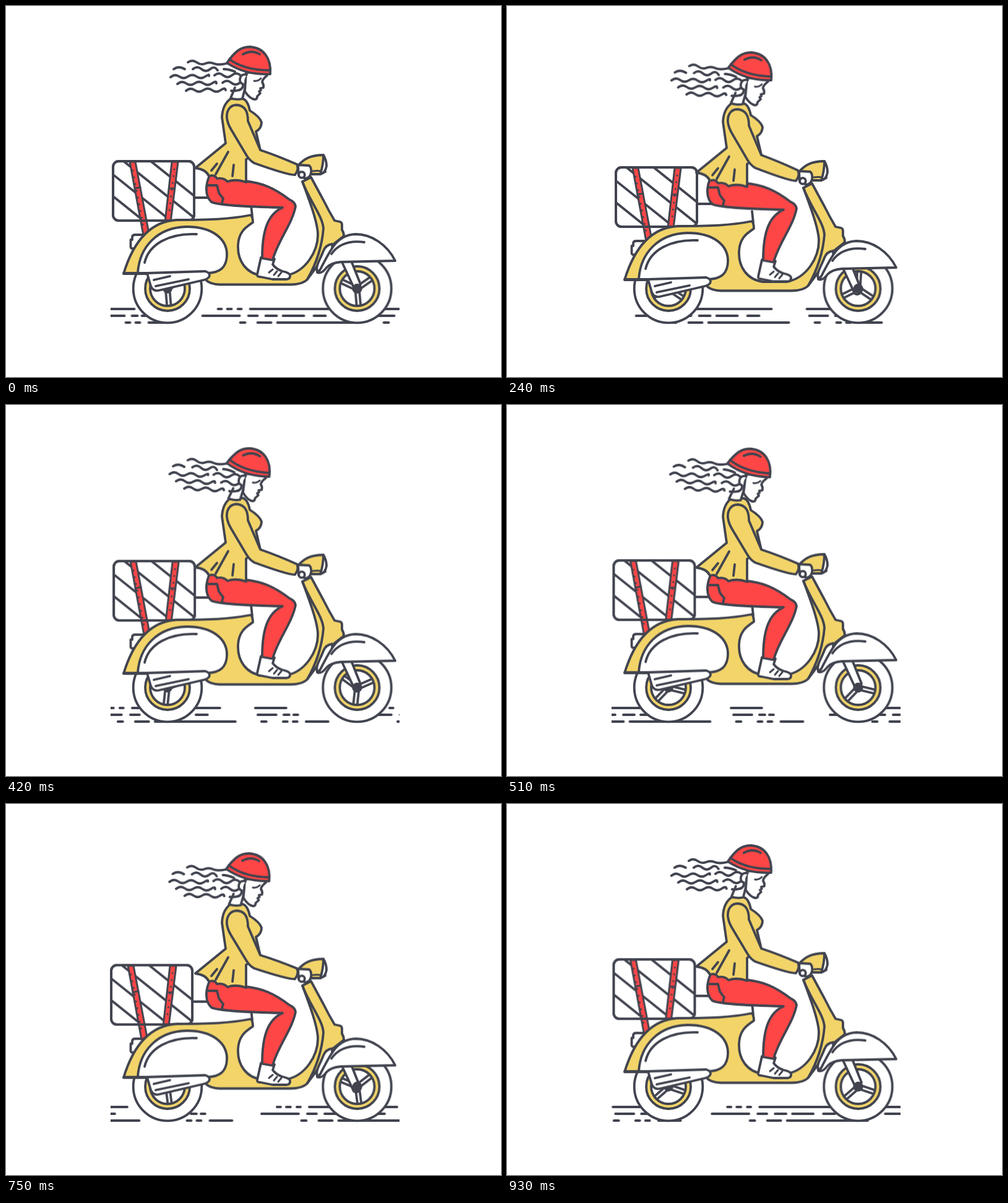
An HTML page for the animation above (0.96 s loop, 800x600 px).

```html
<!DOCTYPE html>
<html lang="en">
<head>
<meta charset="utf-8">
<title>Scooter ride</title>
<style>
html,body{margin:0;width:100%;height:100%;overflow:hidden;background:#fff}
svg{display:block;width:800px;height:600px;fill:none;stroke:#41444f;stroke-width:3.8;stroke-linecap:round;stroke-linejoin:round}
.w{fill:#fff}.y{fill:#f2d469}.r{fill:#ff4646}.k{fill:#41444f}
.thin{stroke-width:3}
.bob{animation:bob .24s cubic-bezier(.364,0,.636,1) infinite alternate}
.sway{animation:sway .48s cubic-bezier(.364,0,.636,1) -.24s infinite alternate}
.nod{animation:nod .48s cubic-bezier(.364,0,.636,1) -.81s infinite alternate}
.tilt{transform-origin:395px 100px;animation:tilt .48s cubic-bezier(.364,0,.636,1) infinite alternate}
.arm{transform-origin:480px 266px;animation:arm .48s cubic-bezier(.364,0,.636,1) -.24s infinite alternate}
.spin{animation:spin .96s linear infinite}
.road{animation:road .96s linear infinite}
@keyframes bob{to{transform:translateY(var(--d,10px))}}
@keyframes sway{
  from{transform:translate(calc(-1*var(--x,0px)),calc(-1*var(--y,0px)))}
  to{transform:translate(var(--x,0px),var(--y,0px))}
}
@keyframes nod{from{transform:translate(.5px,-1.4px)}to{transform:translate(-1.8px,5.4px)}}
@keyframes tilt{to{transform:rotate(3.4deg)}}
@keyframes arm{from{transform:skewY(-1.6deg)}to{transform:skewY(1.6deg)}}
@keyframes spin{to{transform:rotate(360deg)}}
@keyframes road{to{transform:translateX(var(--p))}}
</style>
</head>
<body>
<svg viewBox="0 0 800 600">
<defs>
  <clipPath id="strip"><path d="M169.5 480H635.5V525H169.5Z"/></clipPath>
  <clipPath id="crate"><rect x="173" y="251" width="131" height="96" rx="9"/></clipPath>
  <g id="far">
    <path d="M343 490h6m9 0h7m10 0h6m14 0h142m57 0h50"/>
    <path d="M318 501h60m14 0h15m13 0h18m10 0h34m16 0h19m81 0h30m12 0h9m7 0h7"/>
  </g>
  <path id="near" d="M159 512h8m27 0h7m9 0h7m14 0h36m112 0h8m20 0h22m10 0h130"/>
  <path id="spoke" d="M0-3.2H27M0 3.2H27"/>
  <g id="wheel">
    <circle class="w" r="55.3"/>
    <circle class="y" r="36"/>
    <circle class="w" r="28"/>
    <g class="spin">
      <use href="#spoke" transform="rotate(60)"/>
      <use href="#spoke" transform="rotate(180)"/>
      <use href="#spoke" transform="rotate(300)"/>
    </g>
    <circle class="k" r="6"/>
  </g>
</defs>

<g clip-path="url(#strip)">
  <g class="road" style="--p:-436px">
    <use href="#far" x="-436"/><use href="#far"/><use href="#far" x="436"/>
  </g>
  <g class="road" style="--p:-452px">
    <use href="#near" x="-452"/><use href="#near"/><use href="#near" x="452"/>
  </g>
</g>

<use href="#wheel" x="261" y="457"/>
<use href="#wheel" x="567.5" y="457"/>

<g class="bob">
  <path class="w" d="M222 370H209Q204 370 204 374V378H201.500V390Q202 393 206 392H214"/>
  <path d="M300 310H332M396 322L398 340"/>
  <g class="sway" style="--x:3px">
    <rect class="w" x="173" y="251" width="131" height="96" rx="9"/>
    <g clip-path="url(#crate)">
      <path d="M102 251l130 104M146 251l130 104M190 251l130 104M234 251l130 104"/>
    </g>
    <g class="thin">
      <path class="r" d="M200 252H209L231 368L222 371Z"/>
      <path class="r" d="M268 252H278L266 349H257Z"/>
      <path d="M205 266L222 357" stroke-dasharray=".1 11"/>
      <path d="M272 264L263 339" stroke-dasharray=".1 11"/>
      <path d="M208 295l9-2M264 295h8"/>
    </g>
    <rect x="173" y="251" width="131" height="96" rx="9"/>
  </g>

  <path class="y" d="M190 433C200 400 222 349 276 346C330 346 360 345 396 338Q399 342 399 350C389 357 376 364 375 387C374 412 388 433 414 436H452C485 430 504 396 504 370C504 351 491 316 479 284L493 277L513 314Q522 332 531 347L540 349Q543 350 543 354V362Q546 366 546 372L523 390Q512 409 487 442Q480 450 460 450.500H345Q331 450 324 444V433Z"/>
  <path d="M479 284C491 316 512 340 513 360C511 385 503 414 487 442"/>
  <path class="w" d="M213 431C216 390 244 358 292 357C334 357 358 377 357 404C356 423 346 431 326 432H190"/>
  <path d="M224 415C231 385 264 367 308 369"/>
  <path class="w" d="M228 432L322 429Q329 431 329 436Q328 441 320 443L247 460Q238 462 234 453Z"/>
  <path d="M239 443L265 437M242 453L295 442"/>

  <path class="w" d="M541 410L562 455Q569 459 573 450L557 410Z"/>
  <g class="bob" style="--d:1px">
    <path class="w" d="M503 430C500 420 507 412 513 396Q517 386 527 385L528 412Z"/>
    <path class="w" d="M629 412C616 386 591 369 565 369C536 370 526 391 510 422Q507 429 503 431Q510 434 518 423Q526 415 541 414Z"/>
    <path d="M526 401C538 384 556 379 579 382"/>
  </g>
</g>
<circle class="k" cx="567.500" cy="457" r="6"/>

<g class="bob" style="--d:8px"><g class="sway" style="--y:-4.5px">
  <path class="w" d="M412 407L406 434Q405 438 411 438L431 442H454Q460 441 459 435Q457 431 447 429Q437 426 431 418L434 409Z"/>
  <path d="M431 426l-6 5M438 429l-5 6M445 431l-5 6" class="thin"/>
  <path class="r" d="M330 272C322 288 321 307 332 317C343 322 396 325 447 326C421 337 414 368 414 408L431 411C438 382 463 352 468 324Q467 317 458 313C433 294 414 286 386 283L358 272Z"/>
  <path d="M327 290H341L344 302Q347 307 351 311L349 319"/>
</g></g>

<g class="bob">
  <g class="sway" style="--y:-2.5px">
    <path class="y" d="M363 150Q350 159 349 180L355 222L306 262Q323 264 328 275Q337 272 341 279Q352 277 358 284Q371 279 388 285V248L411 233L404 203Q413 198 413 188Q410 179 394 169Q391 153 383 150Z"/>
    <path d="M359 236L339 272M341 255L332 266M368 257L366 275"/>
  </g>

  <g class="nod"><g class="tilt">
    <path class="w" d="M370 132L363 149Q372 152 382 150L387 130"/>
    <path d="M294 91q7-5 14 0t14 2 14 0 20 0
      M271 102q8-6 18 0M302 102q7-6 14 0t14 0 12 2M352 102q8 0 18 4
      M266 115q7-6 14-1t14 0 14 0 14 0 6-1M337 112q7-6 14 0t14 0 14 0
      M277 126q7-6 14-1t14 0 14 0 14 0 7 0M350 124q7-6 14 0t14 0
      M291 137q7-6 14-1t14 0 14 0 14 0 8 0M364 137q8 1 15-2"/>
    <path class="w" d="M388 108L386 138Q394 150 402 151Q406 151 406 146L411 141L409 138L412 136L411 133L416 132Q417 127 414 123Q414 119 422 112V104Z"/>
    <path class="w" d="M389 111Q379 109 378 119Q378 125 383 126Q384 133 377 136"/>
    <path d="M401 121Q407 122 412 117" class="thin"/>
    <path class="r" d="M357 92C369 75 378 66 394 66C416 67 429 84 427 110C398 111 377 105 357 92Z"/>
    <path d="M361 86C379 99 401 104 427 104M383 78Q397 70 410 78"/>
  </g></g>

  <path class="y" d="M472 258C481 248 491 241 513 241L516 268L508 272H492Z"/>
  <path class="w" d="M513 241Q518 249 518 259Q516 270 508 272Q513 256 513 241Z"/>
  <path d="M496 267Q503 266 509 267" class="thin"/>
  <path class="w" d="M472 257L490 258Q494 261 493 270Q491 278 484 279L473 274Z"/>
  <circle class="w" cx="478" cy="273" r="4.800"/>
  <path class="y arm" d="M357 181C356 168 363 160 373 160C386 161 391 170 391 186L411 233Q438 242 470 256Q474 264 467 273Q457 274 401 254Q394 250 389 242L364 200Q358 190 357 181Z"/>
</g>
</svg>
</body>
</html>
```
